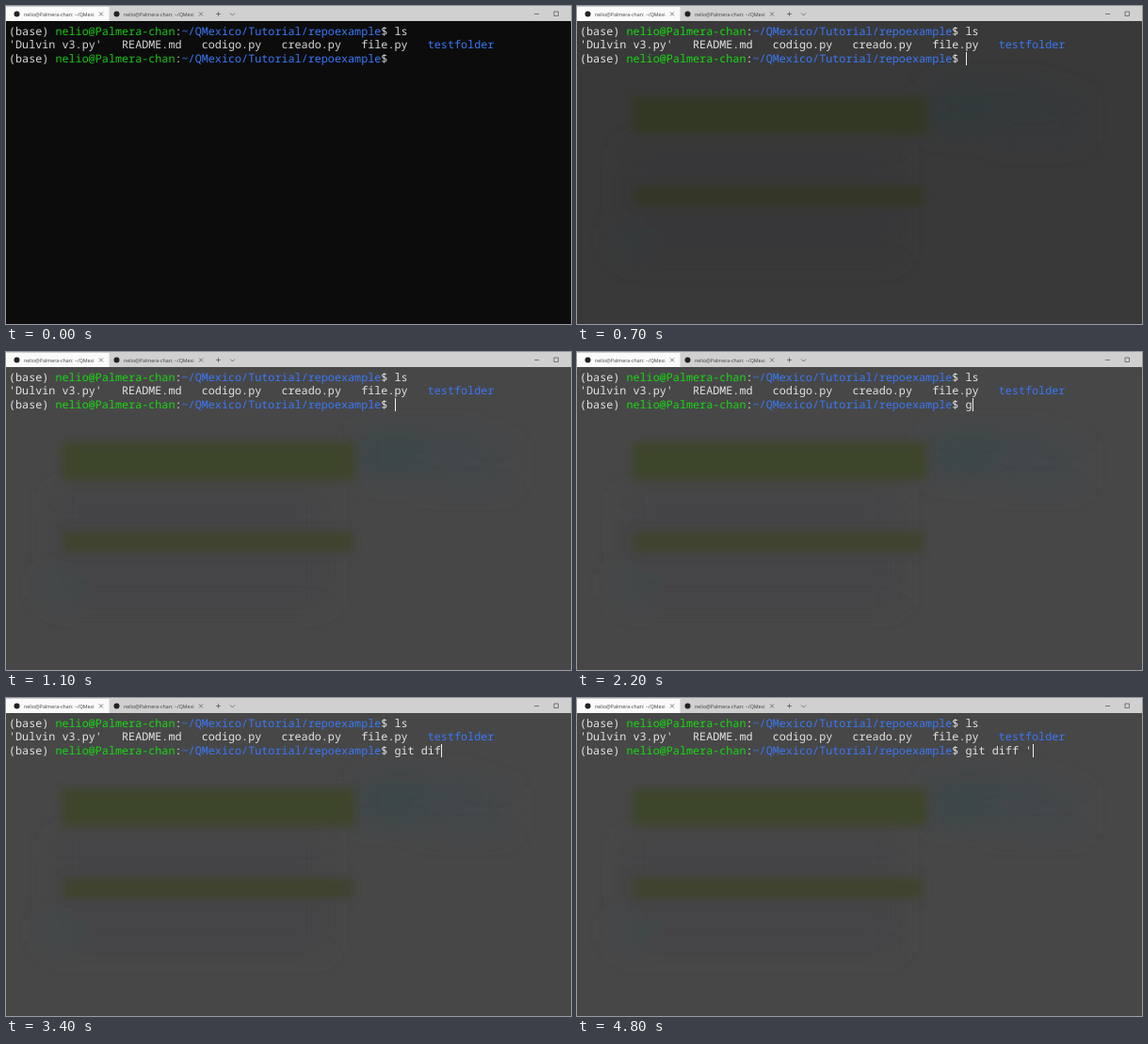
An HTML page that plays this animation: 600 by 338 pixels, repeating every 5 s.

```html
<!DOCTYPE html>
<html lang="es">
<head>
<meta charset="utf-8">
<title>Terminal</title>
<style>
  html, body { margin: 0; width: 100%; height: 100%; overflow: hidden; background: #0c0c0c; }
  svg { display: block; width: 100vw; height: 100vh; }
  text { white-space: pre; text-rendering: geometricPrecision; }
  .term { font: 500 11.78px "Noto Sans Mono", "DejaVu Sans Mono", monospace; font-variant-ligatures: none; fill: #d6d6d6; }
  .user { fill: #1cc41a; }
  .path { fill: #3b78f5; }
  .lit .term { fill: #e4e4e4; }
  .lit .user { fill: #18d812; }
  .title { font: 5.3px "Open Sans", "Noto Sans", sans-serif; fill: #3c3c3c; }
  .icon { fill: none; stroke: #505050; stroke-width: .7; }
</style>
</head>
<body>
<svg id="stage" viewBox="0 0 600 338" preserveAspectRatio="none">
  <defs>
    <filter id="soft" x="-20%" y="-60%" width="140%" height="220%"><feGaussianBlur stdDeviation="5"/></filter>
    <filter id="wide" x="-50%" y="-60%" width="200%" height="220%"><feGaussianBlur stdDeviation="13"/></filter>
    <clipPath id="clip1"><rect x="18" y="0" width="77.5" height="16"/></clipPath>
    <clipPath id="clip2"><rect x="124" y="0" width="77.5" height="16"/></clipPath>
  </defs>

  <rect width="600" height="338" fill="#0c0c0c"/>
  <g id="acrylic" opacity="0">
    <rect width="600" height="338" fill="#474748"/>
    <g filter="url(#wide)">
      <rect x="375" y="84" width="125" height="50" fill="#3e464a"/>
      <rect x="440" y="95" width="95" height="50" fill="#42474a"/>
      <rect x="50" y="150" width="290" height="120" fill="#444547"/>
      <rect x="40" y="235" width="40" height="25" fill="#3f484a"/>
    </g>
    <g filter="url(#soft)" fill="#3e4429">
      <rect x="59" y="96" width="312" height="40"/>
      <rect x="60" y="191" width="308" height="22" fill="#3f432f"/>
    </g>
  </g>

  <rect width="600" height="16" fill="#d0d0d0"/>
  <rect y="1" width="109.5" height="15" fill="#fafafa"/>
  <g id="tabs"></g>
  <g class="icon">
    <path d="M223 8.5h5M225.5 6v5M238 7.5l2.5 2.5l2.5 -2.5"/>
    <path d="M561 8.5h5M582 6h4.5v4.5h-4.5z"/>
  </g>

  <g id="rows"></g>
  <rect id="cursor" y="49" width="1" height="14" fill="#f0f0f0" visibility="hidden"/>
</svg>
<script>
  const LOOP = 5000, LEFT = 3, CELL = 7.068;
  const NS = "http://www.w3.org/2000/svg";
  const $ = id => document.getElementById(id);

  const USER = "nelio@Palmera-chan";
  const PATH = "~/QMexico/Tutorial/repoexample";
  const PROMPT = [["(base) "], [USER, "user"], [":"], [PATH, "path"], ["$ "]];
  const PROMPT_LEN = PROMPT.reduce((n, [s]) => n + s.length, 0);

  // [time, acrylic opacity]
  const FADE = [[0, 0], [700, .77], [800, .86], [900, .92], [1000, .97], [1100, 1]];
  // [time, typed command]
  const TYPING = [
    [0, ""], [2200, "g"], [2300, "gi"], [2500, "git"], [2700, "git "], [2900, "git d"],
    [3100, "git di"], [3300, "git dif"], [3600, "git diff"], [3800, "git diff "], [4800, "git diff '"]
  ];

  function add(parent, tag, attrs, content = "") {
    const el = document.createElementNS(NS, tag);
    for (const key in attrs) el.setAttribute(key, attrs[key]);
    el.textContent = content;
    return parent.appendChild(el);
  }

  function addRow(y, parts) {
    const row = add($("rows"), "text", { class: "term", x: LEFT, y });
    return parts.map(([s, cls = ""]) => add(row, "tspan", { class: cls }, s)).pop();
  }

  function addTab(x, n) {
    const tabs = $("tabs");
    add(tabs, "circle", { cx: x + 11.5, cy: 8.5, r: 3, fill: "#222" });
    const box = add(tabs, "g", { "clip-path": `url(#clip${n})` });
    add(box, "text", { class: "title", x: x + 19, y: 10.7 }, USER + ": ~/QMexi");
    add(tabs, "path", { class: "icon", d: `M${x + 99} 6.5l4 4m0 -4l-4 4` });
  }

  const stepAt = (table, t) => table.filter(([start]) => start <= t).pop()[1];

  addTab(0, 1);
  addTab(106, 2);
  addRow(31, [...PROMPT, ["ls"]]);
  addRow(45.4, [["'Dulvin v3.py'   README.md   codigo.py   creado.py   file.py   "], ["testfolder", "path"]]);
  const command = addRow(59.9, [...PROMPT, [""]]);

  function draw() {
    const t = performance.now() % LOOP;
    const typed = stepAt(TYPING, t);
    const lit = t >= 700;
    command.textContent = typed;
    $("acrylic").setAttribute("opacity", stepAt(FADE, t));
    $("stage").classList.toggle("lit", lit);
    $("cursor").setAttribute("visibility", lit ? "visible" : "hidden");
    $("cursor").setAttribute("x", Math.round(LEFT + (PROMPT_LEN + typed.length) * CELL));
    requestAnimationFrame(draw);
  }
  draw();
</script>
</body>
</html>
```
